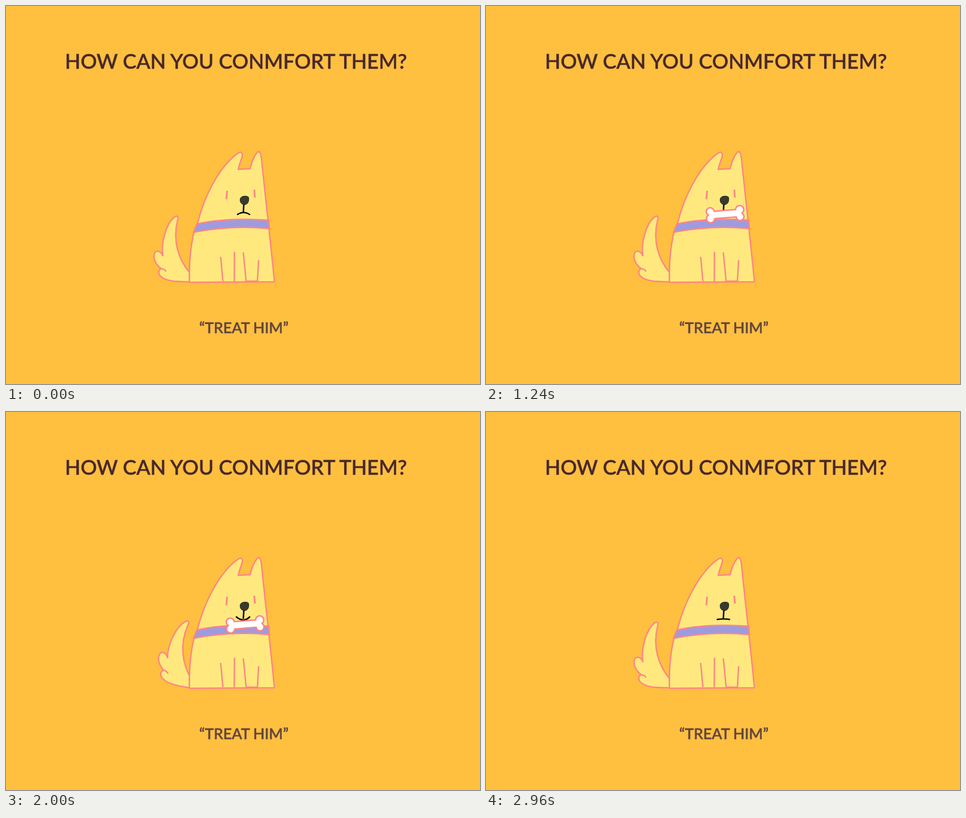
These frames come from a looping animation (837x669 px, 3 s). An HTML page:

```html
<!DOCTYPE html>
<html lang="en">
<head>
<meta charset="utf-8">
<title>Treat him</title>
<style>
  html, body { margin: 0; width: 100%; height: 100%; overflow: hidden; background: #ffbf3f; }
  svg { display: block; width: 837px; height: 669px; }
  text { font-family: Lato, "Open Sans", sans-serif; font-weight: 500; text-anchor: middle; stroke-width: .6; }
  .coat { fill: #ffe97f; }
  .line { stroke: #ff8585; stroke-width: 2.5; stroke-linejoin: round; stroke-linecap: round; }
  .ink { stroke: #0c0b08; stroke-width: 2.6; fill: none; }
</style>
</head>
<body>
<svg viewBox="0 0 837 669">
  <text x="406" y="110.5" font-size="36" fill="#46282d" stroke="#46282d">HOW CAN YOU CONMFORT THEM?</text>
  <text x="420" y="579" font-size="26.5" fill="#604540" stroke="#604540">“TREAT HIM”</text>

  <g id="tail" class="line">
    <path class="coat" d="M324 488C302 488 280 488 271 476C268 470 271 466 274 465C264 457 260 447 262 439C264 431 273 433 277 442C273 420 283 385 297 374C303 369 305 374 303 379C294 415 304 448 325 473L340 480Z"/>
    <path fill="none" d="M274 465Q279 465 282 469"/>
  </g>

  <g class="line">
    <path class="coat" d="M324 489C323 455 326 425 332 400L338 385C350 337 376 285 409 261C417 255 419 262 416 270C413 278 412 281 410 289L431 288C434 276 439 263 445 258C449 257 450 262 451 269C457 330 466 405 474 488Z"/>
    <path fill="#9d9bdf" d="M337 386C375 377 420 376 464 379L465 394C420 389.5 372 392.5 331 400.5Z"/>
    <path fill="none" stroke-linecap="butt" d="M379 444L383 487M403.5 435L403 487M419 436L424 487H444L446 450"/>
    <path fill="none" style="stroke-width:3;stroke-linecap:butt" d="M390.5 327L389 342M438.5 325L439.5 339"/>
  </g>
  <path fill="#3b3a30" stroke="#2a2922" d="M413.5 342C414 336 424 335 428 338C430 343 428 351 422 351.5C416 352 412.5 347 413.5 342Z"/>
  <path class="ink" d="M420 351L419 366"/>
  <path class="ink" id="mouth"/>

  <path id="bone" class="line" fill="#fff" d="M-19.5-5A6.9 6.9 0 1 0-29.5 1.8A7.2 7.2 0 1 0-18.5 8L19.5 5A6.9 6.9 0 1 0 29.5-1.8A7.2 7.2 0 1 0 18.5-8Z"/>
</svg>
<script>
const LOOP = 3000, STEP = 40;
const [tail, mouth, bone] = ["tail", "mouth", "bone"].map(id => document.getElementById(id));

const linear = p => p;
const smooth = p => (1 - Math.cos(Math.PI * p)) / 2;
const mix = (a, b, p) => a + (b - a) * p;

// Value at time t along [time, value] keys
function track(keys, t, ease) {
  if (t <= keys[0][0]) return keys[0][1];
  for (let i = 1; i < keys.length; i++) {
    const [t0, a] = keys[i - 1], [t1, b] = keys[i];
    if (t < t1) return mix(a, b, ease((t - t0) / (t1 - t0)));
  }
  return keys[keys.length - 1][1];
}

const fade = [[300, 0], [550, 1], [2540, 1], [2800, 0]];
const drop = [[520, 211], [1275, 376]];
const wag = [[1436, 0], [1656, 20], [1852, -35], [2060, 20], [2275, -35], [2487, 20], [2700, 0]];
const smile = [[1220, 0], [1410, 1], [2780, 1], [3040, 0]];

function draw(now) {
  const t = Math.floor(now % LOOP / STEP) * STEP;
  bone.setAttribute("opacity", track(fade, t, linear));
  bone.setAttribute("transform", `translate(422.3 ${track(drop, t, linear)})`);
  tail.setAttribute("transform", `rotate(${track(wag, t, smooth)} 324 488)`);
  const s = t ? track(smile, t, linear) : 0;
  const corner = mix(369.5, 362, s), bend = mix(361.5, 374, s);
  mouth.setAttribute("d", `M${mix(408, 406, s)} ${corner}Q419.5 ${bend} 431 ${corner}`);
}

const start = performance.now();
function tick() {
  draw(performance.now() - start);
  requestAnimationFrame(tick);
}
tick();
</script>
</body>
</html>
```
